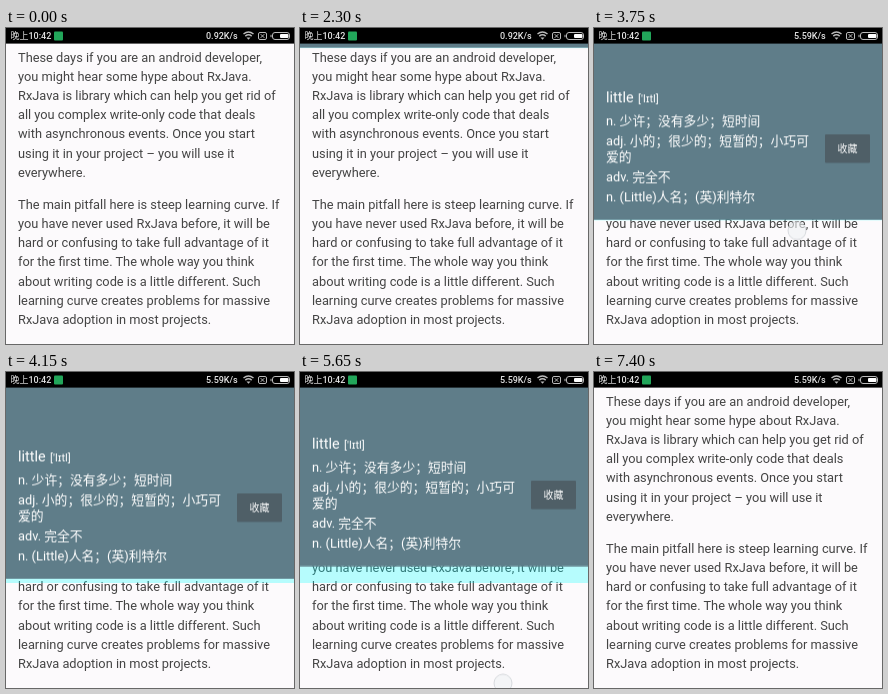
Write an HTML page that moves like this. It is 288 px wide and 316 px high and loops after 7500 ms.

```html
<!DOCTYPE html>
<html lang="zh-CN">
<head>
<meta charset="utf-8">
<title>Word lookup</title>
<style>
  html, body { margin: 0; width: 100%; height: 100%; overflow: hidden; background: #fcfafc; }
  svg { display: block; width: 288px; height: 316px; }
  text { font: 12.8px Roboto, "Noto Sans CJK SC", "Noto Sans CJK", sans-serif; white-space: pre; }
  #article { fill: #444; }
  #panel, #status { fill: #fff; }
  #panel .word { font-size: 14.4px; }
  #panel .sound { font-size: 11.2px; }
  #panel .label { font-size: 10px; text-anchor: middle; }
  #status text { font-size: 9px; font-weight: 500; fill: #e4e4e4; }
  #popup { transform: translateY(-230px); }
</style>
</head>
<body>
<svg viewBox="0 0 288 316">
  <rect width="288" height="316" fill="#fcfafc"/>
  <g id="article"></g>

  <g id="popup">
    <rect id="backdrop" y="120" width="288" height="91" fill="#0ff" fill-opacity=".28"/>
    <g id="panel">
      <rect y="-80" width="288" height="238.6" fill="#5f7d89"/>
      <text class="word" x="12" y="41">little</text>
      <text class="sound" x="44" y="41">['lɪtl]</text>
      <g id="meanings"></g>
      <rect x="231" y="73" width="45" height="28.5" rx="1" fill="#4f5f67"/>
      <text class="label" x="253.5" y="91">收藏</text>
    </g>
  </g>

  <circle id="touch" r="9" fill="#eef2f4" fill-opacity=".6" stroke="#cfd3d6" stroke-opacity=".8"/>

  <g id="status">
    <rect width="288" height="15.6" fill="#000"/>
    <text x="4.5" y="11">晚上10:42</text>
    <rect x="48" y="3.5" width="9" height="9" rx="1" fill="#22a65a"/>
    <text id="slow" x="200" y="11">0.92K/s</text>
    <text id="fast" x="200" y="11">5.59K/s</text>
    <g fill="none" stroke="#bbb">
      <path d="M237.5 6Q242.5 2 247.5 6M239.3 8.1Q242.5 5.5 245.7 8.1" stroke-width="1.5"/>
      <path d="M240.5 9.5L242.5 11.8L244.5 9.5Z" fill="#bbb" stroke="none"/>
      <rect x="252.5" y="4.5" width="8" height="7" rx="1.5"/>
      <path d="M254.7 6.2L258.3 9.8M258.3 6.2L254.7 9.8"/>
      <rect x="266.5" y="4.5" width="17" height="7" rx="2.5"/>
      <path d="M265 6.8V9.2"/>
    </g>
    <rect x="274" y="6" width="8.5" height="4" rx="1"/>
  </g>
</svg>

<script>
const LOOP = 7500;
const EASE = "cubic-bezier(.37,0,.63,1)";
const HOLD = "step-end";
const byId = id => document.getElementById(id);

function addLine(parent, y, words) {
  const line = document.createElementNS("http://www.w3.org/2000/svg", "text");
  line.setAttribute("x", 12);
  line.setAttribute("y", y);
  line.textContent = words;
  parent.append(line);
}

const paragraphs = [
  ["These days if you are an android developer,",
   "you might hear some hype about RxJava.",
   "RxJava is library which can help you get rid of",
   "all you complex write-only code that deals",
   "with asynchronous events. Once you start",
   "using it in your project – you will use it",
   "everywhere."],
  ["The main pitfall here is steep learning curve. If",
   "you have never used RxJava before, it will be",
   "hard or confusing to take full advantage of it",
   "for the first time. The whole way you think",
   "about writing code is a little different. Such",
   "learning curve creates problems for massive",
   "RxJava adoption in most projects."]
];
let baseline = 33.5;
for (const lines of paragraphs) {
  for (const words of lines) {
    addLine(byId("article"), baseline, words);
    baseline += 19.2;
  }
  baseline += 12.8;
}

[[63.5, "n. 少许；没有多少；短时间"],
 [83.5, "adj. 小的；很少的；短暂的；小巧可"],
 [99.5, "爱的"],
 [119.8, "adv. 完全不"],
 [140.3, "n. (Little)人名；(英)利特尔"]
].forEach(([y, words]) => addLine(byId("meanings"), y, words));

// Each step is [time in ms, value, easing towards the next step].
function play(id, property, steps, format = v => v) {
  const all = [[0, steps[0][1]], ...steps, [LOOP, steps.at(-1)[1]]];
  byId(id).animate(
    all.map(([time, value, easing = HOLD]) =>
      ({ offset: time / LOOP, [property]: format(value), easing })),
    { duration: LOOP, iterations: Infinity });
}
const moveY = y => `translateY(${y}px)`;
const moveTo = ([x, y]) => `translate(${x}px, ${y}px)`;

// The popup slides in, and out again after a tap beside it.
play("popup", "transform", [
  [2210, -159, EASE], [2600, 0], [6950, 0, EASE], [7390, -212]
], moveY);

// The panel follows a drag with resistance and springs back.
play("panel", "transform", [
  [3320, 0, EASE], [4050, 52], [4110, 52, EASE], [4350, 0],
  [5040, 0, "linear"], [5100, 6, "ease-out"], [5700, 36],
  [5800, 36, EASE], [6200, 0]
], moveY);

// The backdrop grows with the first drag and keeps its size.
play("backdrop", "transform", [[3320, -52, EASE], [4050, 0]], moveY);

play("touch", "transform", [
  [300, [153.5, 249.5]],
  [3300, [203, 91]], [3320, [203, 91], EASE], [4050, [203, 265]],
  [4900, [203, 193]], [5000, [203, 193], "linear"],
  [5100, [203, 243], "ease-out"], [5700, [203, 312]],
  [6800, [203, 243]]
], moveTo);
play("touch", "opacity", [
  [0, 0], [300, 1], [450, 0], [3300, 1], [4100, 0],
  [4900, 1], [5800, 0], [6800, 1], [6950, 0]
]);

play("slow", "opacity", [[0, 1], [3700, 0]]);
play("fast", "opacity", [[0, 0], [3700, 1]]);
</script>
</body>
</html>
```
